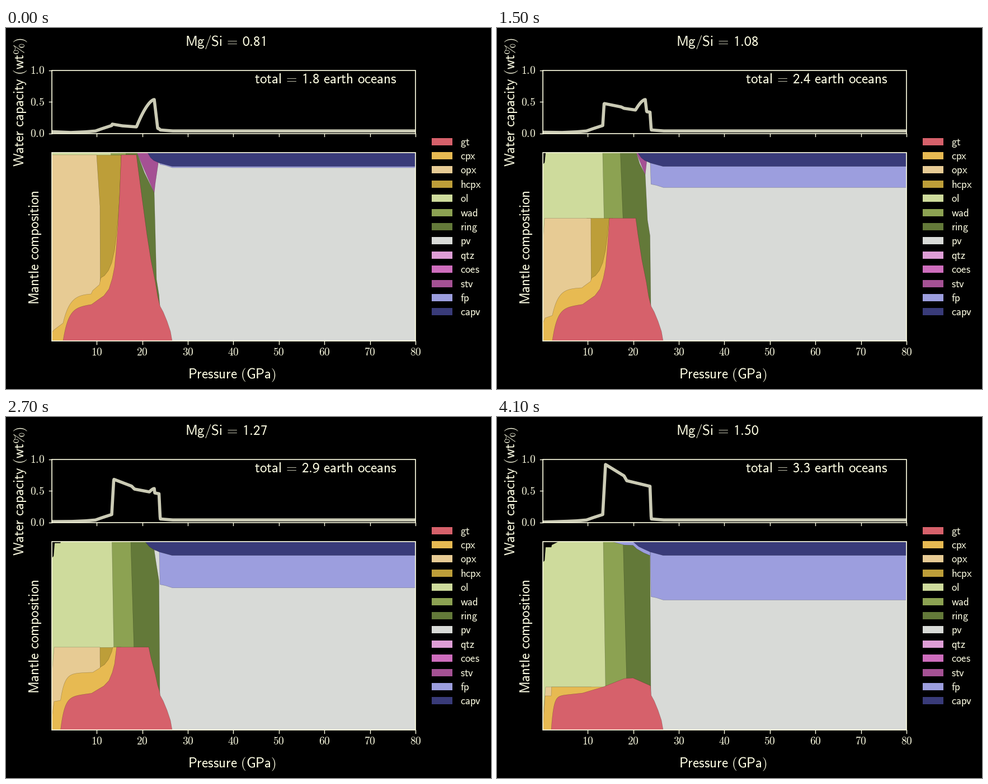
A matplotlib script for the animation above (4.2 s loop, 867 by 646 pixels).

```python
import numpy as np
import matplotlib.pyplot as plt
from matplotlib.animation import FuncAnimation
from matplotlib.patches import Polygon, Rectangle

W, H, DPI = 867, 646, 100
FRAMES, INTERVAL = 42, 100
LEFT, RIGHT = 82, 732
CAP_TOP, CAP_BOT = 76, 188.5    # water capacity panel
TOP, BOT = 223, 560             # composition panel
INK = "#ffffe4"

PHASES = {
    "gt": "#d6616b", "cpx": "#e7ba52", "opx": "#e7cb94", "hcpx": "#bd9e39",
    "ol": "#cedb9c", "wad": "#8ca252", "ring": "#637939", "pv": "#d8dad7",
    "qtz": "#de9ed6", "coes": "#ce6dbd", "stv": "#a55194", "fp": "#9c9ede",
    "capv": "#393b79",
}

# Key points of the garnet top in silica-rich and magnesium-rich mantles
GT_RICH = [(96, 503), (128, 498), (153, 494.5), (165, 486), (175, 479),
           (184, 467), (190, 448), (194, 428), (197, 396), (200, 355),
           (203, 300), (206, 227), (233, 227), (243, 303), (252, 370),
           (259, 415), (267, 455), (271, 480), (275.5, 498)]
GT_POOR = [(96, 500), (153, 494), (190, 483), (215, 473), (228, 468),
           (243, 467), (268, 478), (274.5, 481), (275.5, 498)]
GT_TAIL = [(281, 508), (288, 525), (294, 543), (297, 560)]
CPX_FLANK = [(169.5, 447), (176, 443), (183, 434), (189, 420), (194, 398),
             (197, 374), (200, 345), (203, 302), (206, 227)]

X = np.linspace(LEFT, 300, 437)
plt.rcParams["mathtext.fontset"] = "cm"


def through(points):
    return np.interp(X, *np.transpose(points))


def ramp(p, start, end=1):
    return float(np.clip((p - start) / (end - start), 0, 1))


def ratio(i):
    """Mg/Si at step i: almost linear, slightly ahead in the middle."""
    u = i / (FRAMES - 1)
    return 0.81 + 0.69 * u + 0.4 * u**2 * (1 - u)**3


def oceans(m):
    x = m - 0.81
    return 1.81 + 2.4 * x - 0.28 * x**2


def ol_base(p):
    return 227 + 318 * p - 62 * p**2


def foot(p):
    return 97 + 5 * (1 - p)**2


def ring_top(p):
    return 234 + 39 * p


def gt_top(p):
    u = ramp(p, 0.55)
    rise = (1 - u) * through(GT_RICH + GT_TAIL) + u * through(GT_POOR + GT_TAIL)
    decay = np.exp(-(X - foot(p)) / (9 - 5 * p**2))
    y = np.where(X < 190, rise + (BOT - rise) * decay, rise)
    return np.clip(y, min(ol_base(p), 467), BOT)


def cpx_top(p):
    x0 = foot(p)
    edge = 540 - 41 * p**0.7
    start = 528 - 29 * p**0.8
    rise = through([(97, 475 - 24 * p), (152, 475 - 27 * p),
                    (155, 469 - 18 * p), (167, 459 - 14 * p)] + CPX_FLANK)
    decay = np.exp(-np.maximum(X - x0, 0) / (12.4 - 12 * p**2))
    y = np.where(X < 169, rise + (start - rise) * decay, rise)
    lead = through([(LEFT, min(BOT, edge + 5 + 80 * p**3)), (86, edge),
                    (x0, start)])
    return np.maximum(np.where(X < x0, lead, y), ol_base(p))


def fill_below(x, y):
    return [(x[0], BOT), *zip(x, y), (x[-1], BOT)]


def left_of(top_x, base_x, base):
    return [(LEFT, TOP), (top_x, TOP), (base_x, base), (base_x, BOT),
            (LEFT, BOT)]


def shapes(p):
    """Outline of every moving region, p running from 0 to 1."""
    base = ol_base(p)
    low = max(457, base)
    rx, tip = ring_top(p), 295 - 84 * p
    shoulder = max(248, 478 - 276 * p)
    opx_x = 168 - 6 * (1 - p)**8
    capv_x = 253 - 10 * p**2
    fp = 250 + 77.5 * p**0.82
    spur, late = ramp(p, 0.81), ramp(p, 0.55)
    ledge, gap = TOP + 10 * late, TOP + 37 * p**0.6
    px = X <= 206
    spur_line = [(205, 0), (227, 6), (243, 6.5), (250, 13), (262, 20), (274, 25)]
    return {
        "stv": [(rx, TOP), (265, tip), (267, tip - 18),
                (266 + 6.5 * (1 - p)**3, 240), (268, TOP)],
        "ring": [(200, TOP), (rx, TOP), ((rx + 265) / 2 - 2, (TOP + tip) / 2),
                 (265, tip), (269, shoulder - 28), (273.5, shoulder),
                 (275, 498), (200, 500)],
        "wad": left_of(214 + 11.5 * p**0.6, 214 + 18 * p**0.5, base),
        "ol": left_of(187 + 3 * p**0.5, 187 + 7 * p**0.5, base),
        "hcpx": [(160, base), (206, base), (206, BOT), (160, BOT)],
        "opx": [(LEFT, 227 + 313 * p**0.75), (LEFT + 5 * p**0.5, base),
                (opx_x, base), (168, 0.6 * base + 0.4 * low), (168.5, low),
                (168.5, BOT), (LEFT, BOT)],
        "cpx": fill_below(X[px], cpx_top(p)[px]),
        "gt": fill_below(X, gt_top(p)),
        "fp": [(x, TOP + spur * dy) for x, dy in spur_line]
              + [(274, 240), (275.3, fp - 6), (285, fp - 4), (297.5, fp),
                 (RIGHT, fp), (RIGHT, TOP)],
        "capv": [(capv_x, TOP), ((capv_x + 264) / 2, 232), (264, 237),
                 (274, 241.5), (297, 247.7), (RIGHT, 247.7), (RIGHT, TOP)],
        "gap": [(LEFT, TOP), (LEFT + 28 * p**2, TOP), (98, TOP + 6 * late**3),
                (97, ledge), (87, ledge), (85, gap - 3), (LEFT, gap)],
    }


def water(p):
    """Slow rise, jump, sloping plateau with a spike on it, then a drop."""
    jump = 172 - 87 * p**0.9
    knee_x, knee = 207 + 25 * p**0.25, 175 - 61 * p**0.7
    y = through([
        (LEFT, 185.5 + 2.5 * p), (115, 187), (140, 186), (160, 184.3),
        (169, 181), (189, 174.5), (190 + 4 * p, jump),
        (knee_x - 5, 0.3 * jump + 0.7 * knee), (knee_x, knee),
        (273.5, knee + 5 + 5 * p), (275.7, 182.5), (297, 184.2)])
    d = X - 265
    spike = 128 + np.where(d < 0, 47 * (np.abs(d) / 31)**1.6, 8.4 * d)
    return np.append(X, RIGHT), np.append(np.minimum(y, spike), 184.2)


SANS_DIGITS = {ord("0") + n: chr(0x1D7E2 + n) for n in range(10)}


def sans(s):
    words = [r"\mathrm{%s}" % w.translate(SANS_DIGITS) if w[0].isdigit()
             else r"\mathsf{%s}" % w.replace("%", r"\%") for w in s.split()]
    text = r"\ ".join(words)
    return "$" + text.replace(r"\ \mathsf{=}\ ", r"\,=\,") + "$"


fig = plt.figure(figsize=(W / DPI, H / DPI), dpi=DPI, facecolor="black")
ax = fig.add_axes([0, 0, 1, 1])
ax.set_xlim(0, W)
ax.set_ylim(H, 0)
ax.axis("off")


def label(x, y, s, size=18, **kw):
    return ax.text(x, y, s, size=size, color=INK, va="baseline", **kw)


def stroke(x0, y0, x1, y1):
    ax.plot([x0, x1], [y0, y1], color=INK, lw=1, zorder=20)


def panel(top, bottom, color):
    size = RIGHT - LEFT, bottom - top
    box = ax.add_patch(Rectangle((LEFT, top), *size, fc=color))
    ax.add_patch(Rectangle((LEFT, top), *size, fill=False, ec=INK, lw=1.2,
                           zorder=19))
    return box


cap_box = panel(CAP_TOP, CAP_BOT, "black")
mix_box = panel(TOP, BOT, PHASES["pv"])

for n in range(1, 9):
    x = 162.2 + 81.4 * (n - 1)
    stroke(x, CAP_BOT, x, CAP_BOT + 5.5)
    stroke(x, BOT, x, BOT + 5.5)
    label(x, 586.3, r"$\mathrm{%d}$" % (10 * n), 14, ha="center")
for v in (0, 0.5, 1):
    y = CAP_BOT + (CAP_TOP - CAP_BOT) * v
    stroke(LEFT - 5.5, y, LEFT, y)
    label(69, y + 6.3, r"$\mathrm{%.1f}$" % v, 14, ha="right")

label(404.5, 627.5, sans("Pressure (GPa)"), ha="center")
for x, y, s in [(32, 132.5, "Water capacity (wt%)"),
                (58.7, 393, "Mantle composition")]:
    label(x, y, sans(s), ha="center", rotation=90, rotation_mode="anchor")

for n, (name, color) in enumerate(PHASES.items()):
    y = 203 + 25.4 * n
    ax.add_patch(Rectangle((761, y - 6.5), 37, 13, fc=color))
    label(811.5, y + 6.6, sans(name), 13.5)

title = label(320.5, 32.5, "")
total = label(444.5, 98.8, "")
curve, = ax.plot([], [], color=INK, alpha=0.8, lw=4, zorder=5,
                 solid_joinstyle="round")
curve.set_clip_path(cap_box)

regions = {}
for z, name in enumerate(shapes(0)):
    patch = Polygon([(0, 0), (1, 0), (1, 1)], fc=PHASES.get(name, "black"),
                    ec=(0, 0, 0, 0.3), lw=0.4, zorder=4 + z)
    ax.add_patch(patch)
    patch.set_clip_path(mix_box)
    regions[name] = patch


def update(i):
    m = ratio(i)
    p = float(np.clip((m - 0.81) / 0.69, 0, 1))
    for name, points in shapes(p).items():
        regions[name].set_xy(points)
    curve.set_data(*water(p))
    title.set_text(sans(f"Mg/Si = {m:.2f}"))
    total.set_text(sans(f"total = {oceans(m):.1f} earth oceans"))
    return [*regions.values(), curve, title, total]


anim = FuncAnimation(fig, update, frames=FRAMES, interval=INTERVAL,
                     init_func=lambda: update(0), repeat=True, repeat_delay=0)
plt.show()
```
